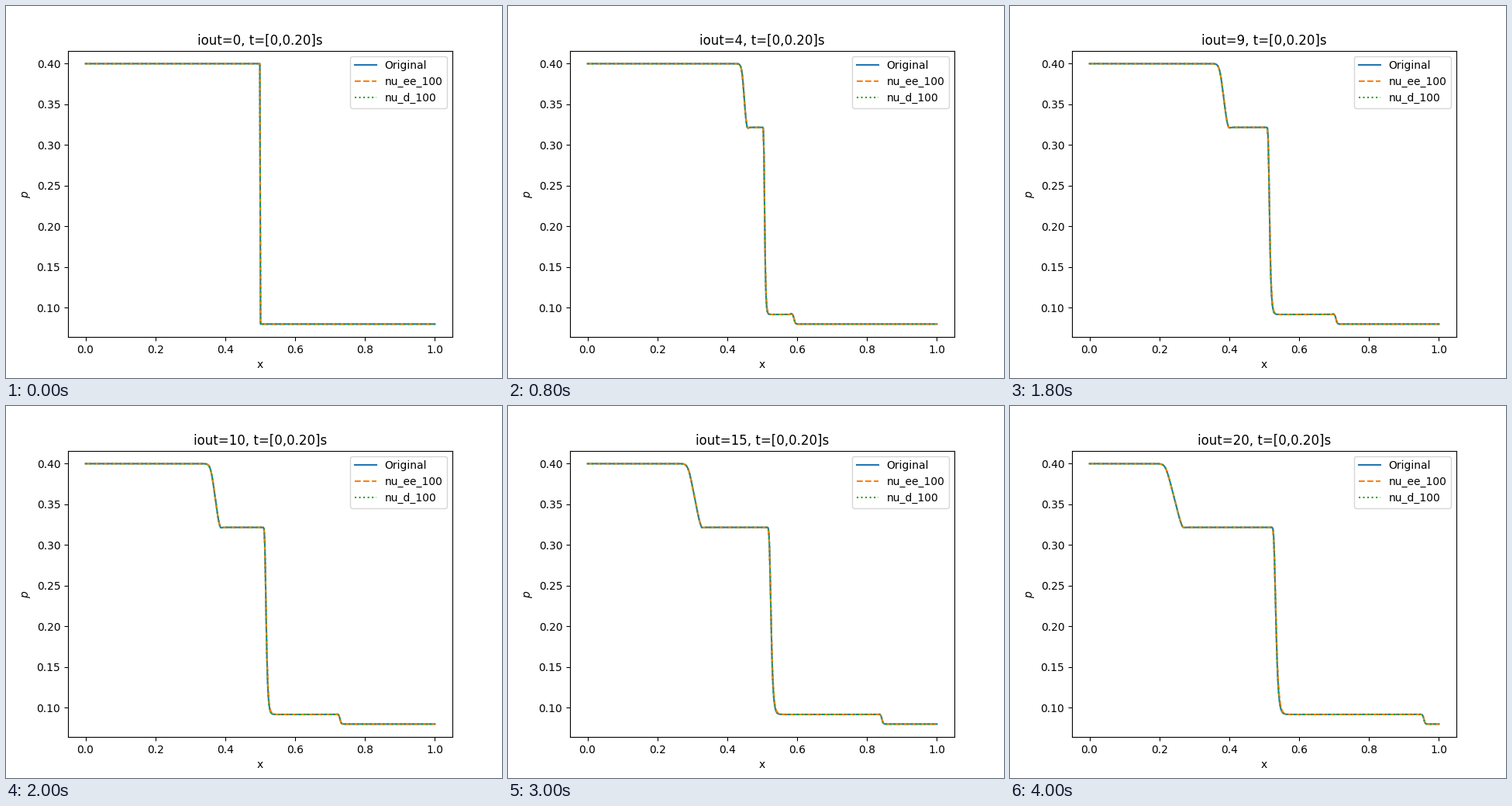
A matplotlib script for the animation above (4200 ms loop, 640x480 px).

```python
import numpy as np
import matplotlib.pyplot as plt
from matplotlib.animation import FuncAnimation

FRAMES, INTERVAL = 21, 200
P_LEFT, P_FAN, P_STAR, P_RIGHT = 0.4, 0.3217, 0.0918, 0.08
x = np.linspace(0, 1, 500)


def bump(center, width):
    return np.exp(-((x - center) / width) ** 2)


def pressure(n, spread=1.0, ripple=1.0):
    """Shock tube profile: rarefaction fan, contact jump and shock."""
    if n == 0:
        return np.where(x < 0.5, P_LEFT, P_RIGHT)

    # Rarefaction: rounded head, sharper foot
    head, foot = 0.5 - 0.0141 * n, 0.5 - 0.0117 * n
    w = 0.0018 * np.cbrt(n)
    ramp = w * (np.logaddexp(0, (x - head) / w)
                - np.logaddexp(0, (x - foot) / w)) / (foot - head)
    p = P_LEFT - (P_LEFT - P_FAN) * np.minimum(1, 1.06 * ramp)
    p -= ripple * 0.005 / (n + 1) * bump(foot + 0.006, 0.004)

    # Contact: steep shoulder, slow tail that spreads with time
    u = (x - 0.5 - 0.0016 * n) / (0.001 * spread * np.sqrt(n))
    upper = 1 - np.exp(-np.exp(np.clip(-u, -50, 50)))

    # Shock with a small overshoot behind it
    shock = 0.5 + 0.02285 * n
    behind = 0.5 * (1 - np.tanh((x - shock) / 0.0034))
    low = P_RIGHT + (P_STAR - P_RIGHT) * behind
    low += ripple * 0.006 / (n + 1) * bump(shock - 0.007, 0.004)
    return low + (p - P_STAR) * upper


fig, ax = plt.subplots(figsize=(6.4, 4.8), dpi=100)
STYLES = [("Original", "-", 1.0, 1.0),
          ("nu_ee_100", "--", 1.12, 0.6),
          ("nu_d_100", ":", 1.0, 1.0)]
curves = [(ax.plot(x, pressure(0), style, label=label)[0], spread, ripple)
          for label, style, spread, ripple in STYLES]
ax.set(xlim=(-0.05, 1.05), ylim=(0.064, 0.416), xlabel="x", ylabel="$p$")
ax.legend(loc="upper right")
title = ax.set_title("")


def update(n):
    for line, spread, ripple in curves:
        line.set_ydata(pressure(n, spread, ripple))
    title.set_text(f"iout={n}, t=[0,0.20]s")
    return [line for line, *_ in curves] + [title]


anim = FuncAnimation(fig, update, frames=FRAMES, interval=INTERVAL,
                     repeat=True, repeat_delay=0)
plt.show()
```
